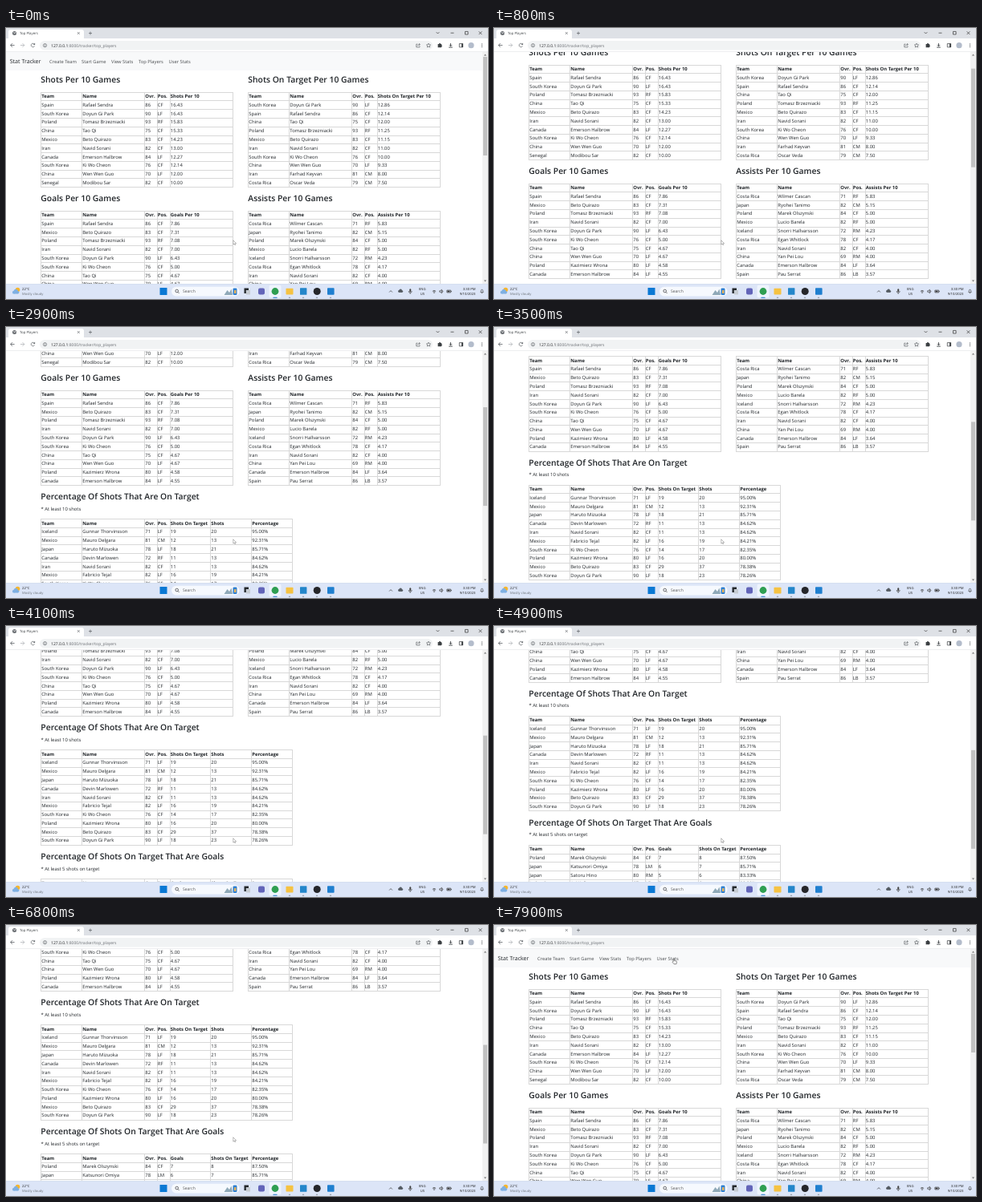
These frames come from a looping animation (600 by 338 pixels, 8 s). An HTML page with a canvas:

```html
<!DOCTYPE html>
<html lang="en">
<head>
<meta charset="utf-8">
<title>Top Players</title>
<style>
html, body { margin: 0; width: 100%; height: 100%; overflow: hidden; background: #fff; }
canvas { display: block; width: 600px; height: 338px; }
</style>
</head>
<body>
<canvas id="stage"></canvas>
<script>
const W = 600, H = 338, LOOP = 8000, STEP = 100;
const VIEW = { top: 30, bottom: 319 };
const ROW = 10.78;
const FONT = '"Open Sans", "Noto Sans", sans-serif';
const INK = '#212529', ICON = '#5f6368', LINE = '#d8d8d8';

const canvas = document.getElementById('stage');
const ctx = canvas.getContext('2d');
const ratio = window.devicePixelRatio || 1;
canvas.width = W * ratio;
canvas.height = H * ratio;

// key: name, team, overall, position
const players = {};
`send Rafael Sendra,Spain,86,CF
park Doyun Gi Park,South Korea,90,LF
brze Tomasz Brzezniacki,Poland,93,RF
tao Tao Qi,China,75,CF
beto Beto Quirazo,Mexico,83,CF
navi Navid Sorani,Iran,82,CF
emer Emerson Halbrow,Canada,84,LF
cheo Ki Wo Cheon,South Korea,76,CF
wen Wen Wen Guo,China,70,LF
modi Modibou Sar,Senegal,82,CF
farh Farhad Keyvan,Iran,81,CM
osca Oscar Veda,Costa Rica,79,CM
wilm Wilmer Cascan,Costa Rica,71,RF
ryo Ryohei Tanimo,Japan,82,CM
mare Marek Olszynski,Poland,84,CF
luci Lucio Barela,Mexico,82,RF
snor Snorri Hallvarsson,Iceland,72,RM
egan Egan Whitlock,Costa Rica,78,CF
yan Yan Pei Lou,China,69,RM
pau Pau Serrat,Spain,86,LB
kazi Kazimierz Wrona,Poland,80,LF
gunn Gunnar Thorvinsson,Iceland,71,LF
maur Mauro Delgara,Mexico,81,CM
haru Haruto Mizuoka,Japan,78,LF
devi Devin Marlowen,Canada,72,RF
fabr Fabricio Tejal,Mexico,82,LF
kats Katsunori Omiya,Japan,78,LM
sato Satoru Hino,Japan,80,RM
ari Ari Kolbrunsson,Iceland,67,LF
rami Ramiro Pineral,Mexico,81,RM
theo Theodore Blane,Canada,79,CF`.split('\n').forEach(line => {
  const gap = line.indexOf(' ');
  const [name, team, ovr, pos] = line.slice(gap + 1).split(',');
  players[line.slice(0, gap)] = [team, name, ovr, pos];
});

const BASE = [43.5, 94.5, 172.5, 188, 204];
const NARROW = [...BASE, 282.5];
const WIDE = [...BASE, 254.5, 305.5, 356.5];

// "key value" for rates, "key made/tries" for percentages
function makeRows(text) {
  return text.split(', ').map(item => {
    const [key, value] = item.split(' ');
    const parts = value.split('/');
    if (parts.length > 1) parts.push((100 * parts[0] / parts[1]).toFixed(2) + '%');
    return [...players[key], ...parts];
  });
}

const tables = [
  { title: 'Shots Per 10 Games', x: 0, y: 65, cols: NARROW, heads: ['Shots Per 10'],
    rows: 'send 16.43, park 16.43, brze 15.83, tao 15.33, beto 14.23, navi 13.00, emer 12.27, cheo 12.14, wen 12.00, modi 10.00' },
  { title: 'Shots On Target Per 10 Games', x: 258, y: 65, cols: NARROW, heads: ['Shots On Target Per 10'],
    rows: 'park 12.86, send 12.14, tao 12.00, brze 11.25, beto 11.15, navi 11.00, cheo 10.00, wen 9.33, farh 8.00, osca 7.50' },
  { title: 'Goals Per 10 Games', x: 0, y: 213, cols: NARROW, heads: ['Goals Per 10'],
    rows: 'send 7.86, beto 7.31, brze 7.08, navi 7.00, park 6.43, cheo 5.00, tao 4.67, wen 4.67, kazi 4.58, emer 4.55' },
  { title: 'Assists Per 10 Games', x: 258, y: 213, cols: NARROW, heads: ['Assists Per 10'],
    rows: 'wilm 5.83, ryo 5.15, mare 5.00, luci 5.00, snor 4.23, egan 4.17, navi 4.00, yan 4.00, emer 3.64, pau 3.57' },
  { title: 'Percentage Of Shots That Are On Target', note: '* At least 10 shots', x: 0, y: 361, cols: WIDE,
    heads: ['Shots On Target', 'Shots', 'Percentage'],
    rows: 'gunn 19/20, maur 12/13, haru 18/21, devi 11/13, navi 11/13, fabr 16/19, cheo 14/17, kazi 16/20, beto 29/37, park 18/23' },
  { title: 'Percentage Of Shots On Target That Are Goals', note: '* At least 5 shots on target', x: 0, y: 522, cols: WIDE,
    heads: ['Goals', 'Shots On Target', 'Percentage'],
    rows: 'mare 7/8, kats 6/7, sato 5/6, ari 5/6, rami 8/10, theo 8/10, wilm 4/5, haru 14/18, navi 7/9, brze 10/13' }
];
tables.forEach(t => {
  t.rows = makeRows(t.rows);
  t.heads = ['Team', 'Name', 'Ovr.', 'Pos.', ...t.heads];
});

// [time, scroll] and [time, x, y]
const scrollKeys = [[300, 0], [800, 34], [1900, 88], [2900, 149], [4100, 234], [4400, 252],
  [4500, 252], [5700, 325], [6300, 352], [6600, 352], [7400, 0]];
const pointerKeys = [[7100, 282.5, 264.5], [7500, 255.5, 151], [7900, 222, 41.5]];

function along(keys, t) {
  if (t <= keys[0][0]) return keys[0].slice(1);
  for (let i = 1; i < keys.length; i++) {
    const a = keys[i - 1], b = keys[i];
    if (t <= b[0]) {
      const k = (t - a[0]) / (b[0] - a[0]);
      return a.slice(1).map((v, j) => v + (b[j + 1] - v) * k);
    }
  }
  return keys[keys.length - 1].slice(1);
}

// y is the middle of the capitals
function text(str, x, y, size = 5.9, color = INK, weight = 400, align = 'left') {
  ctx.font = `${weight} ${size}px ${FONT}`;
  ctx.fillStyle = color;
  ctx.textAlign = align;
  ctx.fillText(str, x, y + size * 0.36);
}

function rect(x, y, w, h, color, r = 0) {
  ctx.fillStyle = color;
  ctx.beginPath();
  ctx.roundRect(x, y, w, h, r);
  ctx.fill();
}

function disc(x, y, r, color) {
  ctx.fillStyle = color;
  ctx.beginPath();
  ctx.arc(x, y, r, 0, 7);
  ctx.fill();
}

function ring(x, y, r, color = ICON, from = 0, to = 7) {
  ctx.strokeStyle = color;
  ctx.lineWidth = 0.7;
  ctx.beginPath();
  ctx.arc(x, y, r, from, to);
  ctx.stroke();
}

function shape(x, y, d, stroke, fill, width = 0.7) {
  const p = new Path2D(d);
  ctx.save();
  ctx.translate(x, y);
  if (fill) { ctx.fillStyle = fill; ctx.fill(p); }
  if (stroke) { ctx.strokeStyle = stroke; ctx.lineWidth = width; ctx.stroke(p); }
  ctx.restore();
}

function drawTable(t, scroll) {
  const y = t.y - scroll;
  if (y > VIEW.bottom + 12 || y < VIEW.top - 160) return;
  const cols = t.cols.map(c => c + t.x);
  const left = cols[0], right = cols[cols.length - 1];
  const first = y + (t.note ? 32.5 : 20);
  const top = first - ROW / 2;
  text(t.title, left - 0.2, y - 0.3, 10.37, INK, 600);
  if (t.note) text(t.note, left, y + 14.5);

  const lineAt = i => Math.round(top + i * ROW);
  const count = t.rows.length + 1;
  for (let i = 0; i <= count; i++) rect(left - 0.5, lineAt(i), right - left + 1, 1, LINE);
  cols.forEach(c => rect(Math.round(c - 0.5), lineAt(0), 1, lineAt(count) - lineAt(0), LINE));

  t.heads.forEach((h, i) => text(h, cols[i] + 0.8, first, 5.9, INK, 700));
  t.rows.forEach((row, r) =>
    row.forEach((cell, i) => text(cell, cols[i] + 0.8, first + (r + 1) * ROW)));
}

function drawPage(scroll) {
  ctx.save();
  ctx.beginPath();
  ctx.rect(0, VIEW.top, W, VIEW.bottom - VIEW.top);
  ctx.clip();
  rect(0, VIEW.top, W, VIEW.bottom - VIEW.top, '#fff');
  rect(0, 30 - scroll, 593, 23, '#f8f9fa');
  text('Stat Tracker', 4.7, 41.5 - scroll, 7.1);
  [['Create Team', 54], ['Start Game', 94], ['View Stats', 131], ['Top Players', 165], ['User Stats', 202.5]]
    .forEach(([label, x]) => text(label, x, 41.5 - scroll, 5.8, '#4a4d50'));
  tables.forEach(t => drawTable(t, scroll));

  rect(593, VIEW.top, 7, VIEW.bottom - VIEW.top, '#f1f1f1');
  rect(594, 36 + scroll * 0.43, 5, 123, '#c1c1c1');
  shape(596.5, 33.5, 'M-1.6 1L0-1L1.6 1Z', null, '#777');
  shape(596.5, 315.5, 'M-1.6-1L0 1L1.6-1Z', null, '#777');
  ctx.restore();
}

function drawBrowser() {
  rect(0, 0, W, 13, '#dee1e6');
  rect(3, 2, 94, 13, '#fff', 3);
  disc(10.5, 6.5, 2.5, ICON);
  shape(10.5, 6.5, 'M-1.5-1L0-.3L-.4 1M.6-1.6L1.6 .4', '#fff');
  text('Top Players', 17, 6.5, 4.3, '#3c4043');
  shape(90.3, 6.5, 'M-1.4-1.4L1.4 1.4M-1.4 1.4L1.4-1.4', ICON);
  shape(105, 6.5, 'M-2 0H2M0-2V2', ICON);
  shape(537.5, 6, 'M-1.8-.8L0 1L1.8-.8', '#333');
  shape(555.5, 6.2, 'M-2 0H2', '#333');
  shape(573.3, 6.2, 'M-1.8-1.8H1.8V1.8H-1.8Z', '#333');
  shape(590.5, 6.2, 'M-1.9-1.9L1.9 1.9M-1.9 1.9L1.9-1.9', '#333');

  rect(0, 13, W, 17, '#fff');
  rect(0, 29.4, W, 0.6, '#dcdee1');
  shape(8, 21.5, 'M2.6 0H-2.4M0-2.4L-2.4 0L0 2.4', ICON, null, 0.8);
  shape(20.5, 21.5, 'M-2.6 0H2.4M0-2.4L2.4 0L0 2.4', '#b4b7ba', null, 0.8);
  ring(33.5, 21.5, 2.3, ICON, 0.4, 5.6);
  shape(33.5, 21.5, 'M2.6-2.7V-.4H.3Z', null, ICON);

  rect(42, 16, 489, 11.5, '#f1f3f4', 5.75);
  ring(48.5, 21.7, 2.1);
  shape(48.5, 21.7, 'M0-.3V1.2M0-1.2V-.7', ICON);
  const host = '127.0.0.1';
  text(host, 56, 21.7, 5.05, '#202124');
  text(':8000/tracker/top_players', 56 + ctx.measureText(host).width, 21.7, 5.05, '#6a6e73');

  shape(513, 21.7, 'M-.6-1.6H-2.2V2.2H2V.8M-.8 .6Q-.4-1.2 2.3-1.2M1-2.5L2.4-1.2L1 0', ICON);
  shape(526, 21.7, 'M0-2.6L.8-.9L2.6-.7L1.3 .5L1.7 2.3L0 1.4L-1.7 2.3L-1.3 .5L-2.6-.7L-.8-.9Z', ICON);
  shape(540, 21.7, 'M-2.4-1.6H-.8V-2.7H.8V-1.6H2.2V.1H3V1.1H2.2V2.6H-2.4Z', null, '#3c4043');
  shape(553.5, 21.7, 'M0-2.6V1M-1.6-.5L0 1.1L1.6-.5M-2.3 2.4H2.3', '#3c4043', null, 0.9);
  shape(566.5, 21.7, 'M-2.2-2.2H2.2V2.2H-2.2Z', '#3c4043');
  rect(567, 19.5, 1.8, 4.4, '#3c4043');
  disc(579, 21.7, 3.6, '#b3bccb');
  [-1.9, 0, 1.9].forEach(d => disc(592.5, 21.7 + d, 0.6, ICON));
}

function cloud(x, y, color, k = 1) {
  disc(x - 2 * k, y + 0.6 * k, 1.7 * k, color);
  disc(x + 0.2 * k, y - 0.7 * k, 2.3 * k, color);
  disc(x + 2.4 * k, y + 0.7 * k, 1.6 * k, color);
  rect(x - 2 * k, y, 4.4 * k, 2.3 * k, color);
}

function drawTaskbar() {
  rect(0, 319, W, 19, '#dce5f7');
  rect(0, 319, W, 0.5, '#d0d9ea');
  disc(14.5, 326.5, 2.8, '#f6b52c');
  cloud(12, 329, '#7fb0e2', 1.1);
  text('22°C', 20, 325, 4.3, '#222');
  text('Mostly cloudy', 20, 331.5, 4.1, '#6b7178');

  rect(191.5, 324, 9, 9, '#0a78d4', 0.5);
  rect(206, 322.8, 84.5, 11.6, '#f6f9fe', 5.8);
  ring(212.7, 328, 1.8, '#333');
  shape(214, 329.4, 'M0 0L1.6 1.6', '#333');
  text('Search', 220, 328.6, 5, '#555');
  shape(271.5, 333, 'M0 0L4-6L6.5-3L9-7.5L10.5 0Z', null, '#8fa9b8');
  rect(282.5, 324.5, 5, 8.5, '#2f7fd0', 1.2);
  rect(284, 327, 2.4, 4, '#e8b45c', 0.6);

  rect(296.5, 324.5, 5.5, 6.5, '#24282c');
  rect(298.8, 327, 5.2, 5.5, '#c6ccd3');
  rect(314, 324.5, 8, 8, '#6264b8', 2);
  rect(327.5, 320.8, 15, 15.5, '#eef4fd', 2);
  disc(335, 328.5, 4.4, '#2f9f52');
  rect(348.5, 324.7, 9, 7.8, '#f5c242', 0.8);
  rect(366, 324.2, 8.4, 8.6, '#2486ca', 0.5);
  disc(387.2, 328.5, 4.5, '#25262a');
  rect(400, 324.2, 8.6, 8.6, '#1f7fcf', 0.8);
  rect(332.4, 335.8, 5.2, 1, '#1a73c8', 0.5);
  [353, 370, 387, 404].forEach(x => rect(x - 1.2, 335.8, 2.4, 0.9, '#858d95', 0.4));

  shape(479, 328.5, 'M-1.9 1L0-.9L1.9 1', '#333');
  cloud(491, 328, '#555c63', 0.8);
  rect(502.3, 325.2, 1.9, 4.2, '#444', 1);
  shape(503.2, 328.6, 'M-2-.6Q-2 1.8 0 1.8Q2 1.8 2-.6M0 1.8V3.2', '#444');
  text('ENG', 518.3, 325.2, 4.2, '#222', 400, 'center');
  text('US', 518.3, 331.6, 4.2, '#222', 400, 'center');
  [2.9, 1.7].forEach(r => ring(533, 330.4, r, '#333', 3.9, 5.52));
  disc(533, 330.2, 0.6, '#333');
  shape(542, 328.5, 'M-2.2-.8H-1.2L.4-2.2V2.2L-1.2 .8H-2.2Z M1.4-1.2Q2.4 0 1.4 1.2', '#333');
  shape(551.5, 328.5, 'M-2.6-1.4H2.2V1.4H-2.6Z M2.9-.5V.5', '#333');
  rect(549.5, 327.7, 3, 1.6, '#333');
  text('3:30 PM', 584.5, 325.2, 4.2, '#222', 400, 'right');
  text('9/10/2023', 584.5, 331.6, 4.2, '#222', 400, 'right');
  shape(592.5, 328.3, 'M-1.7 1.4Q-1.2 .8-1.2-.6A1.2 1.4 0 0 1 1.2-.6Q1.2 .8 1.7 1.4ZM-.5 2.2H.5', '#444');
}

function drawPointer(x, y) {
  if (y < 50) {
    shape(x, y, 'M1.2 4.2V.8Q1.8-.2 2.4 .8V3L5 3.6Q5.8 4 5.5 5.2L4.9 7.2H2L.1 4.8Q.2 3.8 1.2 4.2Z', '#444', '#fff', 0.6);
  } else {
    shape(x, y, 'M.3 .2V5.6L1.6 4.5L2.4 6.3L3.2 5.9L2.4 4.2H4.1Z', '#777', '#fff', 0.5);
  }
}

function draw(time) {
  const t = Math.floor((time % LOOP) / STEP) * STEP;
  ctx.setTransform(ratio, 0, 0, ratio, 0, 0);
  ctx.textRendering = 'geometricPrecision';
  drawBrowser();
  drawPage(along(scrollKeys, t)[0]);
  drawTaskbar();
  drawPointer(...along(pointerKeys, t));
}

const start = performance.now();
function tick() {
  draw(performance.now() - start);
  requestAnimationFrame(tick);
}
tick();
</script>
</body>
</html>
```
